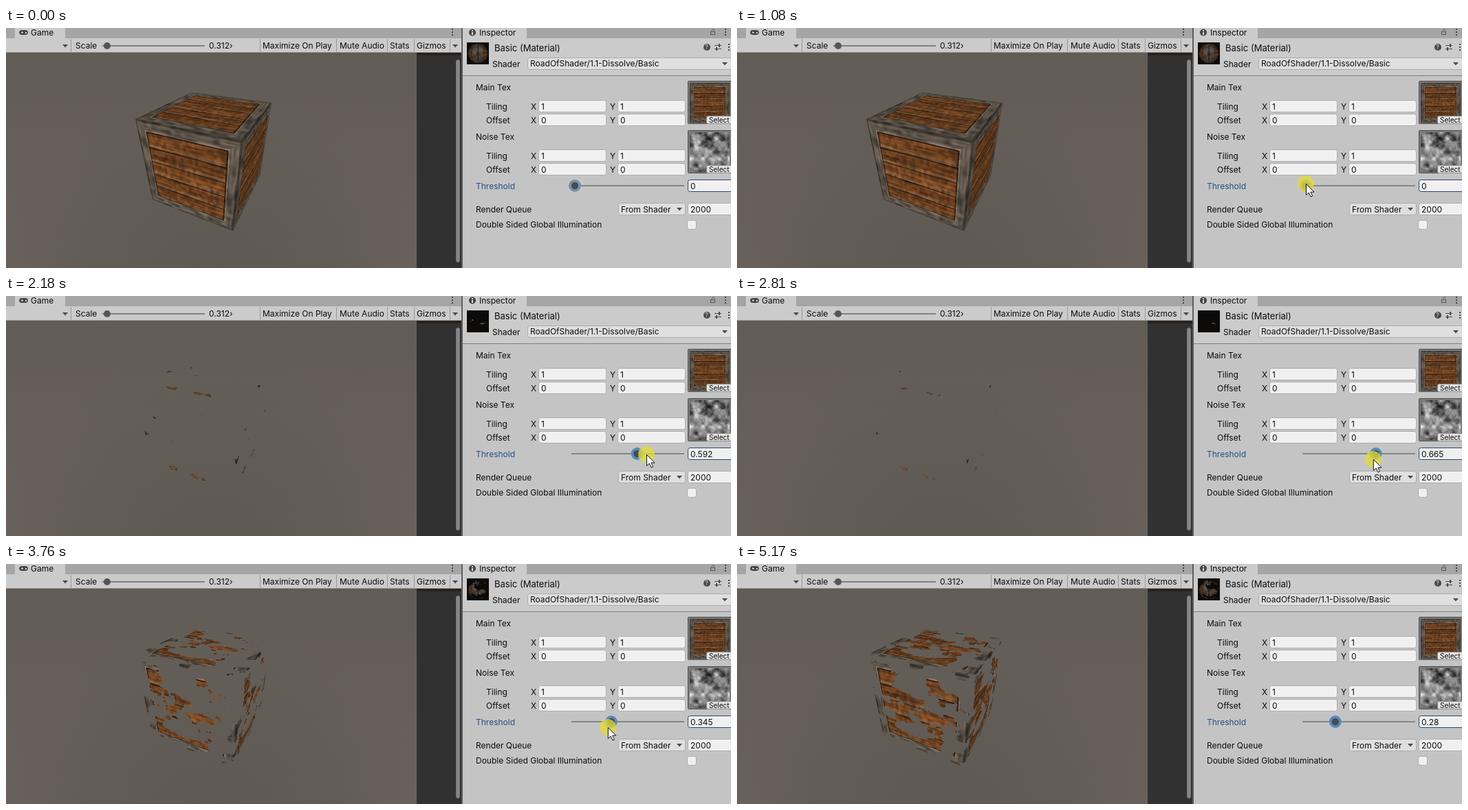
An HTML page with a canvas for the animation above (5.33 s loop, 1054 px wide and 350 px high).

```html
<!DOCTYPE html>
<html lang="en">
<head>
<meta charset="utf-8">
<title>Dissolve shader</title>
<style>
  html, body { margin: 0; width: 100%; height: 100%; overflow: hidden; background: #c4c4c4; }
  canvas { display: block; }
</style>
</head>
<body>
<canvas id="stage" width="1054" height="350"></canvas>
<script>
const start = performance.now();
const LOOP = 5330, STEP = 78.4, PHASE = 56;
const ctx = document.getElementById('stage').getContext('2d');
const clamp = (v, lo, hi) => Math.min(hi, Math.max(lo, v));

// ---------- motion, counted in screen refreshes ----------
const PRESS = 13, DRAG = 17, RELEASE = 53, GONE = 58;
const drag = [[DRAG, 0], [21, 0.26], [27, 0.592], [28, 0.68], [32, 0.74], [41, 0.514], [47, 0.345], [49, 0.28]];

function thresholdAt(tick) {
  const next = drag.findIndex(([at]) => at > tick);
  if (next === 0) return 0;
  if (next < 0) return drag[drag.length - 1][1];
  const [a, from] = drag[next - 1], [b, to] = drag[next];
  return from + (to - from) * (tick - a) / (b - a);
}

const knobX = threshold => 827 + 153 * threshold;

function cursorAt(tick) {
  if (tick < 11) {
    const left = (1 - tick / 11) ** 2;
    return [827 + 167 * left, 227 + 114 * left];
  }
  const leave = Math.max(0, (tick - RELEASE) / 4);
  const sink = 11 * clamp((tick - 23) / 11, 0, 1);
  // The knob trails the pointer by one refresh.
  return [knobX(thresholdAt(tick + 1)) + 69 * leave, 227 + sink + 100 * leave];
}

// ---------- noise and textures ----------
function hash(x, y) {
  let h = Math.imul(x + 17, 374761393) + Math.imul(y + 5, 668265263);
  h = Math.imul(h ^ (h >>> 13), 1274126177);
  return ((h ^ (h >>> 16)) >>> 0) / 2 ** 32;
}

function tileNoise(u, v, nx, ny) {
  const x = u * nx, y = v * ny, ix = Math.floor(x), iy = Math.floor(y);
  const ease = k => k * k * (3 - 2 * k);
  const fx = ease(x - ix), fy = ease(y - iy);
  const at = (a, b) => hash((a % nx + nx) % nx + nx * 31, (b % ny + ny) % ny);
  const top = at(ix, iy) * (1 - fx) + at(ix + 1, iy) * fx;
  const low = at(ix, iy + 1) * (1 - fx) + at(ix + 1, iy + 1) * fx;
  return top * (1 - fy) + low * fy;
}

// Roughly zero mean and unit deviation.
function clouds(u, v, nx, ny) {
  let sum = 0;
  for (let o = 0; o < 4; o++) sum += tileNoise(u, v, nx << o, ny << o) / 2 ** o;
  return (sum - 0.94) / 0.24;
}

// Threshold at which a texture point vanishes; the square stretches the bright tail.
function vanishAt(u, v, nx, ny) {
  const c = clouds(u, v, nx, ny);
  return Math.max(0.02, 0.27 + 0.12 * c + 0.02 * Math.max(0, c) ** 2);
}

function crateColor(u, v) {
  const edgeX = Math.min(u, 1 - u), edgeY = Math.min(v, 1 - v), edge = Math.min(edgeX, edgeY);
  if (edge < 0.1) {
    const grain = edgeX < edgeY ? tileNoise(u, v, 60, 9) : tileNoise(u, v, 9, 60);
    let g = 46 + 34 * grain + 36 * tileNoise(u, v, 20, 20);
    if (edge < 0.014) g *= 0.65;
    if (edge > 0.088) g *= 1.3;
    return [g * 1.08, g * 0.97, g * 0.85];
  }
  const row = (v - 0.1) / 0.8 * 5, plank = Math.floor(row), f = row - plank;
  const grain = 0.5 + 0.5 * tileNoise(u, v, 5, 70) + 0.4 * tileNoise(u, v, 34, 26);
  let k = grain * (0.85 + 0.25 * hash(plank, 3));
  if (edge < 0.112 || f < 0.08) k *= 0.45;
  return f > 0.8 ? [120 * k, 84 * k, 54 * k] : [108 * k, 64 * k, 32 * k];
}

// shade(x, y) returns [r, g, b, noise] or null outside the shape.
function makeSprite(w, h, shade) {
  const canvas = document.createElement('canvas');
  canvas.width = w;
  canvas.height = h;
  const g = canvas.getContext('2d'), image = g.createImageData(w, h);
  const noise = new Float32Array(w * h), cover = new Float32Array(w * h);
  for (let i = 0; i < w * h; i++) {
    const sum = [0, 0, 0, 0];
    let hits = 0;
    for (let s = 0; s < 4; s++) {
      const c = shade(i % w + 0.25 + 0.5 * (s & 1), Math.floor(i / w) + 0.25 + 0.5 * (s >> 1));
      if (!c) continue;
      hits++;
      c.forEach((value, j) => sum[j] += value);
    }
    if (!hits) continue;
    for (let j = 0; j < 3; j++) image.data[i * 4 + j] = sum[j] / hits;
    image.data[i * 4 + 3] = cover[i] = hits * 63.75;
    noise[i] = sum[3] / hits;
  }
  g.putImageData(image, 0, 0);
  let current = 0;
  return {
    canvas,
    dissolve(t) {
      if (t === current) return;
      current = t;
      for (let i = 0; i < w * h; i++) image.data[i * 4 + 3] = noise[i] >= t ? cover[i] : 0;
      g.putImageData(image, 0, 0);
    }
  };
}

// Maps screen points back to the unit square of a projected quad.
function unproject([[x0, y0], [x1, y1], [x2, y2], [x3, y3]]) {
  const sx = x0 - x1 + x2 - x3, sy = y0 - y1 + y2 - y3;
  const dx1 = x1 - x2, dy1 = y1 - y2, dx2 = x3 - x2, dy2 = y3 - y2;
  const det = dx1 * dy2 - dx2 * dy1;
  const g = (sx * dy2 - dx2 * sy) / det, h = (dx1 * sy - sx * dy1) / det;
  const a = x1 - x0 + g * x1, b = x3 - x0 + h * x3, c = x0;
  const d = y1 - y0 + g * y1, e = y3 - y0 + h * y3, f = y0;
  return (x, y) => {
    const w = (d * h - e * g) * x + (b * g - a * h) * y + a * e - b * d;
    return [((e - f * h) * x + (c * h - b) * y + b * f - c * e) / w,
      ((f * g - d) * x + (a - c * g) * y + c * d - a * f) / w];
  };
}

const left = [188, 133], back = [270, 94], right = [386, 109], front = [344, 166];
const lowLeft = [213, 250], lowFront = [330, 296], lowRight = [369, 215];
const faces = [
  { map: unproject([back, right, front, left]), light: 0.95 },
  { map: unproject([left, front, lowFront, lowLeft]), light: 1.05 },
  { map: unproject([front, right, lowRight, lowFront]), light: 0.86 }
];
const CRATE_X = 186, CRATE_Y = 92;

const crate = makeSprite(202, 206, (x, y) => {
  for (const { map, light } of faces) {
    const [u, v] = map(x + CRATE_X, y + CRATE_Y);
    if (u < 0 || v < 0 || u > 1 || v > 1) continue;
    return [...crateColor(u, v).map(c => c * light), vanishAt(u, v, 6, 8)];
  }
  return null;
});

const preview = makeSprite(32, 32, (px, py) => {
  const x = (px - 16) / 14.5, y = (py - 16) / 14.5, r = x * x + y * y;
  if (r > 1) return null;
  const z = Math.sqrt(1 - r), light = 0.35 + 0.6 * z;
  const u = (Math.atan2(x, z) / (2 * Math.PI) + 1) % 1, v = 0.5 + Math.asin(y) / Math.PI;
  return [...crateColor(u, v).map(c => c * light), vanishAt(u, v, 10, 7)];
});

const mainThumb = makeSprite(58, 58, (x, y) => [...crateColor(x / 58, y / 58), 1]);

const noiseThumb = makeSprite(58, 58, (x, y) => {
  const g = clamp(128 + 42 * clouds(x / 58, y / 58, 6, 6), 25, 245);
  return [g, g, g, 1];
});

// ---------- drawing helpers ----------
function rect(x, y, w, h, color) {
  ctx.fillStyle = color;
  ctx.fillRect(x, y, w, h);
}

function disc(x, y, r, color) {
  ctx.fillStyle = color;
  ctx.beginPath();
  ctx.arc(x, y, r, 0, 7);
  ctx.fill();
}

function box(x, y, w, h, fill, stroke, radius = 3) {
  ctx.beginPath();
  ctx.roundRect(x + 0.5, y + 0.5, w - 1, h - 1, radius);
  ctx.fillStyle = fill;
  ctx.fill();
  ctx.strokeStyle = stroke;
  ctx.lineWidth = 1;
  ctx.stroke();
}

function text(s, x, y, color = '#0c0c0c', size = 12) {
  ctx.font = `${size}px Inter, sans-serif`;
  ctx.fillStyle = color;
  ctx.fillText(s, x, Math.round(y + size * 0.35));
}

function polygon(points, fill) {
  ctx.beginPath();
  points.forEach(([x, y]) => ctx.lineTo(x, y));
  ctx.closePath();
  ctx.fillStyle = fill;
  ctx.fill();
}

function gradient(fill, ...colors) {
  colors.forEach((color, i) => fill.addColorStop(i / (colors.length - 1), color));
  return fill;
}

const arrowDown = (x, y) => polygon([[x - 4, y - 2], [x + 4, y - 2], [x, y + 2.5]], '#4a4a4a');
const dots = (x, y) => [-4, 0, 4].forEach(d => rect(x - 1, y + d - 1, 2, 2, '#444'));
const field = (s, x, y, w = 99, border = '#adadad') => {
  box(x, y, w, 18, '#f0f0f0', border);
  text(s, x + 4, y + 9.5);
};

// ---------- panels ----------
function drawGame(threshold) {
  rect(0, 0, 662, 15, '#a5a5a5');
  rect(13, 0, 73, 15, '#cbcbcb');
  rect(0, 15, 662, 21, '#cbcbcb');
  rect(0, 35, 662, 1, '#999');
  box(19, 3, 13, 7, '#444', '#444', 3);
  rect(22, 6, 3, 1, '#ddd');
  rect(23, 5, 1, 3, '#ddd');
  rect(28, 6, 2, 2, '#ddd');
  text('Game', 36, 7);
  dots(649, 6);

  [94, 369, 480, 554, 593, 645].forEach(x => rect(x, 16, 1, 19, '#999'));
  arrowDown(86, 26);
  text('Scale', 101, 26);
  rect(140, 25, 149, 2, '#808080');
  disc(147, 26, 5, '#555');
  text('0.312›', 295, 26);
  text('Maximize On Play', 373, 26);
  text('Mute Audio', 485, 26);
  text('Stats', 558, 26);
  text('Gizmos', 597, 26);
  arrowDown(653, 26);

  rect(0, 36, 597, 314, gradient(ctx.createLinearGradient(0, 36, 0, 350), '#625c56', '#675f59', '#6a615b'));
  rect(0, 36, 597, 314, gradient(ctx.createRadialGradient(298, 400, 40, 298, 400, 330),
    'rgba(91,88,81,.85)', 'rgba(94,90,84,.65)', 'rgba(98,94,88,0)'));
  rect(597, 36, 65, 314, '#313131');
  rect(597, 36, 65, 4, '#29221f');
  box(654, 46, 6, 296, '#868686', '#787878', 3);

  crate.dissolve(threshold);
  ctx.drawImage(crate.canvas, CRATE_X, CRATE_Y);
}

function drawHeader(threshold) {
  rect(662, 0, 2, 350, '#5e5e5e');
  rect(664, 0, 390, 15, '#a5a5a5');
  rect(664, 0, 93, 15, '#cbcbcb');
  rect(664, 15, 390, 54, '#cbcbcb');
  rect(664, 69, 390, 1, '#7f7f7f');
  rect(664, 70, 390, 280, '#c4c4c4');

  disc(678, 6.5, 5, '#444');
  rect(677, 3, 2, 2, '#ddd');
  rect(677, 6, 2, 4, '#ddd');
  text('Inspector', 688, 7);
  ctx.strokeStyle = '#555';
  ctx.lineWidth = 1;
  ctx.strokeRect(1024.5, 5.5, 6, 4);
  ctx.beginPath();
  ctx.arc(1028, 4, 2, Math.PI, 0);
  ctx.stroke();
  dots(1046, 6);

  rect(670, 21, 32, 32, '#0c0b0a');
  preview.dissolve(threshold);
  ctx.drawImage(preview.canvas, 670, 21);
  text('Basic (Material)', 710, 29.5, '#0c0c0c', 13);
  disc(1019, 28, 5, '#4a4a4a');
  text('?', 1016.3, 28, '#ddd', 9);
  [[25, 1036], [30, 1032]].forEach(([y, x]) => {
    rect(1030, y, 10, 1, '#4a4a4a');
    rect(x, y - 2, 2, 5, '#4a4a4a');
  });
  dots(1051, 28);
  text('Shader', 707, 52.5);
  box(758, 43, 300, 18, '#dfdfdf', '#adadad');
  text('RoadOfShader/1.1-Dissolve/Basic', 762, 52);
  arrowDown(1045, 52);
}

function drawTextureSlot(label, y, thumb) {
  text(label, 683, y);
  [['Tiling', '1', 28], ['Offset', '0', 48]].forEach(([name, value, dy]) => {
    text(name, 698, y + dy);
    text('X', 763, y + dy);
    field(value, 774, y + dy - 10);
    text('Y', 878, y + dy);
    field(value, 889, y + dy - 10);
  });
  box(991, y - 10, 70, 63, '#7c7c7c', '#4d4d4d', 1);
  ctx.drawImage(thumb.canvas, 994, y - 7);
  box(1018, y + 41, 40, 12, '#e2e2e2', '#8e8e8e', 2);
  text('Select', 1022, y + 47.5, '#0c0c0c', 10);
}

function drawProperties(tick, threshold) {
  drawTextureSlot('Main Tex', 87, mainThumb);
  drawTextureSlot('Noise Tex', 159, noiseThumb);

  text('Threshold', 683, 231, '#234f83');
  rect(822, 229, 164, 2, '#858585');
  disc(knobX(threshold), 230, 9, tick < DRAG ? '#7692ae' : '#548bbf');
  disc(knobX(threshold), 230, 5.2, '#4c4c4c');
  field(String(+threshold.toFixed(3)), 991, 221, 70, '#2b4a70');

  text('Render Queue', 683, 265);
  box(890, 255, 98, 18, '#dfdfdf', '#adadad');
  text('From Shader', 894, 264.5);
  arrowDown(979, 264);
  field('2000', 991, 255, 70);
  text('Double Sided Global Illumination', 683, 287);
  box(990, 280, 14, 14, '#f0f0f0', '#adadad');
}

function drawCursor(tick) {
  if (tick < 0 || tick >= GONE) return;
  const [x, y] = cursorAt(tick);
  if (tick >= PRESS && tick < RELEASE) disc(x, y, 12, 'rgba(226,220,52,.76)');
  const arrow = [[0, 0], [0, 16], [3.8, 12.6], [6.6, 18.6], [9.2, 17.5], [6.4, 11.7], [11.5, 11.7]];
  polygon(arrow.map(([dx, dy]) => [x + 0.5 + dx, y + 0.5 + dy]), '#fff');
  ctx.strokeStyle = '#111';
  ctx.lineWidth = 1;
  ctx.stroke();
}

function frame() {
  const time = (performance.now() - start) % LOOP;
  const tick = Math.floor((time - PHASE) / STEP);
  const threshold = thresholdAt(tick);
  drawGame(threshold);
  drawHeader(threshold);
  drawProperties(tick, threshold);
  drawCursor(tick);
  requestAnimationFrame(frame);
}
frame();
</script>
</body>
</html>
```
